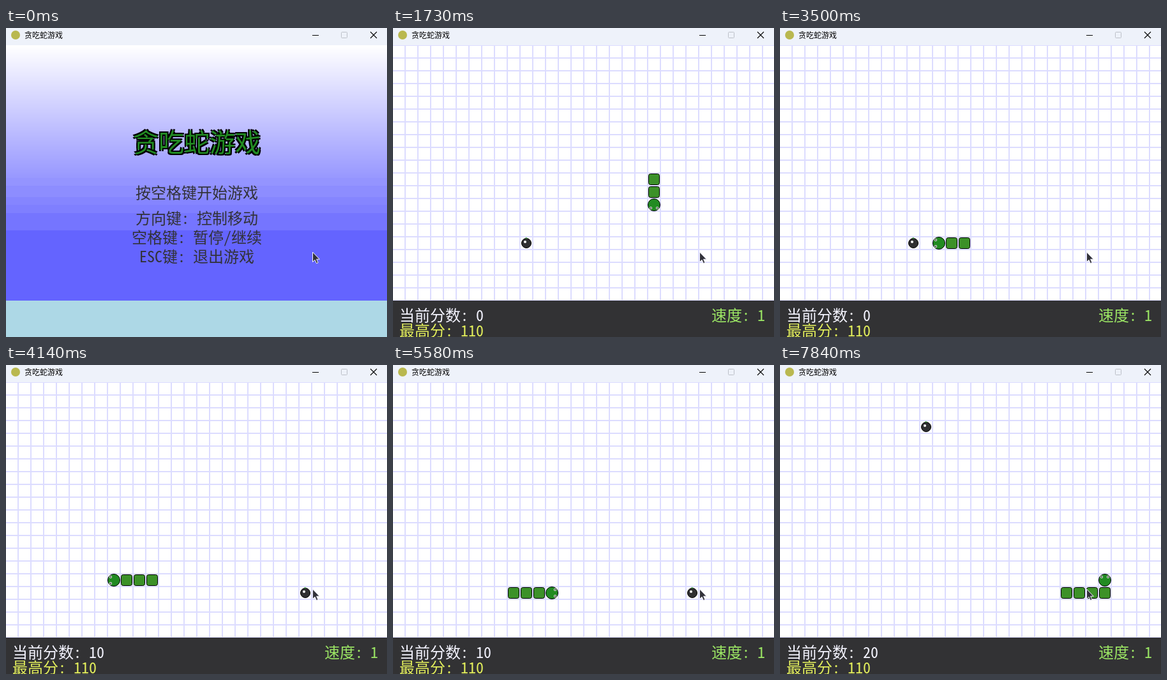
Recreate the animation shown at these times as an HTML page with a canvas. Size 597 px wide and 484 px high, loop 8000 ms.

```html
<!DOCTYPE html>
<html lang="zh">
<head>
<meta charset="utf-8">
<title>贪吃蛇游戏</title>
<style>
html, body { margin: 0; width: 100%; height: 100%; overflow: hidden; }
canvas { display: block; }
</style>
</head>
<body>
<canvas id="stage" width="597" height="484"></canvas>
<script>
const ctx = document.getElementById('stage').getContext('2d');
const LOOP = 8000, W = 597, H = 484, TOP = 27, PANEL = 427, CELL = 20;
const MONO = '"Noto Sans Mono CJK SC", "Noto Sans CJK SC", "Noto Sans CJK", monospace';

// Snake route: direction and number of cells; step 0 is the third cell
const DIRS = { R: [1, 0], L: [-1, 0], D: [0, 1], U: [0, -1] };
const ROUTE = [['R', 6], ['D', 5], ['L', 14], ['D', 1], ['R', 19], ['U', 1]];
const LEAD = 2;
const path = [{ x: 289, y: 237, dir: DIRS.R }];
for (const [name, count] of ROUTE) {
  const dir = DIRS[name];
  for (let i = 0; i < count; i++) {
    const last = path[path.length - 1];
    path.push({ x: last.x + dir[0] * CELL, y: last.y + dir[1] * CELL, dir });
  }
}

// Step numbers and their times in ms, evenly spaced in between
const KNOTS = [[0, 730], [1, 910], [6, 1730], [7, 1880], [13, 2860], [37, 6700], [41, 7360], [44, 7840]];
const stepTimes = [KNOTS[0][1]];
for (let i = 1; i < KNOTS.length; i++) {
  const [k0, t0] = KNOTS[i - 1], [k1, t1] = KNOTS[i];
  for (let k = k0 + 1; k <= k1; k++) {
    stepTimes.push(Math.round((t0 + (t1 - t0) * (k - k0) / (k1 - k0)) / 10) * 10);
  }
}

const MEALS = [19, 41];
const FOODS = [[209, 337], [469, 357], [229, 97]];

function rect(x, y, w, h, color) {
  ctx.fillStyle = color;
  ctx.fillRect(x, y, w, h);
}

function disc(x, y, r, color, outline) {
  ctx.beginPath();
  ctx.arc(x, y, r, 0, Math.PI * 2);
  ctx.fillStyle = color;
  ctx.fill();
  if (outline) stroke(outline);
}

function stroke(color, width = 1) {
  ctx.strokeStyle = color;
  ctx.lineWidth = width;
  ctx.stroke();
}

function polyline(points) {
  ctx.beginPath();
  points.forEach(([x, y]) => ctx.lineTo(x, y));
}

function text(str, x, y, size, color, align = 'left') {
  ctx.font = `${size}px ${MONO}`;
  ctx.textAlign = align;
  ctx.fillStyle = color;
  ctx.fillText(str, x, y);
}

function drawTitleBar() {
  rect(0, 0, W, TOP, '#eef2fa');
  disc(15, 11, 7, '#b9b84f');
  text('贪吃蛇游戏', 29, 15.5, 12, '#000');
  rect(480, 11, 10, 1, '#000');
  ctx.beginPath();
  ctx.roundRect(525.5, 6.5, 9, 9, 1);
  stroke('#bcc0c8');
  polyline([[571, 6], [581, 16]]);
  stroke('#000', 1.1);
  polyline([[581, 6], [571, 16]]);
  stroke('#000', 1.1);
}

function drawMenu() {
  const shade = y => {
    const v = Math.round(255 - (y - TOP) / 2);
    return `rgb(${v},${v},255)`;
  };
  for (let y = TOP; y < 235; y++) rect(0, y, W, 1, shade(y));
  const bands = [235, 247, 265, 277, 290, 317];
  for (let i = 0; i < bands.length - 1; i++) {
    rect(0, bands[i], W, bands[i + 1] - bands[i], shade((bands[i] + bands[i + 1]) / 2));
  }
  rect(0, 317, W, PANEL - 317, '#6464ff');
  rect(0, PANEL, W, H - PANEL, '#add8e6');

  const title = (dx, dy, color) => text('贪吃蛇游戏', 299 + dx, 194 + dy, 40, color, 'center');
  for (const dx of [-2, 2]) for (const dy of [-2, 2]) title(dx, dy, '#000');
  title(0, 0, '#228b22');

  const lines = [['按空格键开始游戏', 267], ['方向键: 控制移动', 307],
                 ['空格键: 暂停/继续', 337], ['ESC键: 退出游戏', 367]];
  for (const [str, y] of lines) text(str, 299, y, 24, '#323237', 'center');
}

function drawGrid() {
  rect(0, TOP, W, PANEL - TOP, '#fff');
  for (let x = 18; x < W; x += CELL) rect(x, TOP, 2, PANEL - TOP, '#dcdcff');
  for (let y = TOP - 1; y < PANEL; y += CELL) {
    const top = Math.max(y, TOP);
    rect(0, top, W, y + 2 - top, '#dcdcff');
  }
}

function drawFood([x, y]) {
  disc(x, y, 7.5, '#2f2f31', '#000');
  disc(x - 2, y - 2, 2, '#fff');
  polyline([[x - 1.5, y - 7], [x - 0.5, y - 9.5], [x + 1.5, y - 7]]);
  ctx.fillStyle = '#228b22';
  ctx.fill();
}

function drawSnake(step, length) {
  const end = step + LEAD;
  for (let i = end - length + 1; i < end; i++) {
    const { x, y } = path[i];
    ctx.beginPath();
    ctx.roundRect(x - 8.5, y - 8.5, 17, 17, 3);
    ctx.fillStyle = '#3c9128';
    ctx.fill();
    stroke('#000');
  }
  const { x, y, dir: [dx, dy] } = path[end];
  disc(x, y, 9.5, '#228b22', '#000');
  for (const side of [-5, 5]) {
    const ex = x + dx * 5 + dy * side, ey = y + dy * 5 + dx * side;
    disc(ex, ey, 2, '#fff');
    disc(ex, ey, 1, '#000');
  }
}

function drawPanel(score) {
  rect(0, PANEL, W, H - PANEL, '#323234');
  text(`当前分数: ${score}`, 10, 458.5, 24, '#f4f4ff');
  text('最高分: 110', 10, 483, 24, '#e2ee5c');
  text('速度: 1', 499, 458.5, 24, '#9be564');
}

function drawCursor() {
  polyline([[480.5, 351], [480.5, 366.5], [484, 363.2], [486.5, 368.7],
            [489, 367.6], [486.6, 362.2], [491.3, 362.2]]);
  ctx.closePath();
  ctx.fillStyle = '#32323a';
  ctx.fill();
  stroke('#f4f4ff');
}

function draw(time) {
  const step = stepTimes.filter(t => t <= time).length - 1;
  if (step < 0) {
    drawMenu();
  } else {
    const eaten = MEALS.filter(k => k <= step).length;
    const grown = MEALS.filter(k => k < step).length;
    drawGrid();
    drawFood(FOODS[eaten]);
    drawSnake(step, 3 + grown);
    drawPanel(eaten * 10);
  }
  drawTitleBar();
  drawCursor();
}

const start = performance.now();
function tick() {
  draw((performance.now() - start) % LOOP);
  requestAnimationFrame(tick);
}
tick();
</script>
</body>
</html>
```
